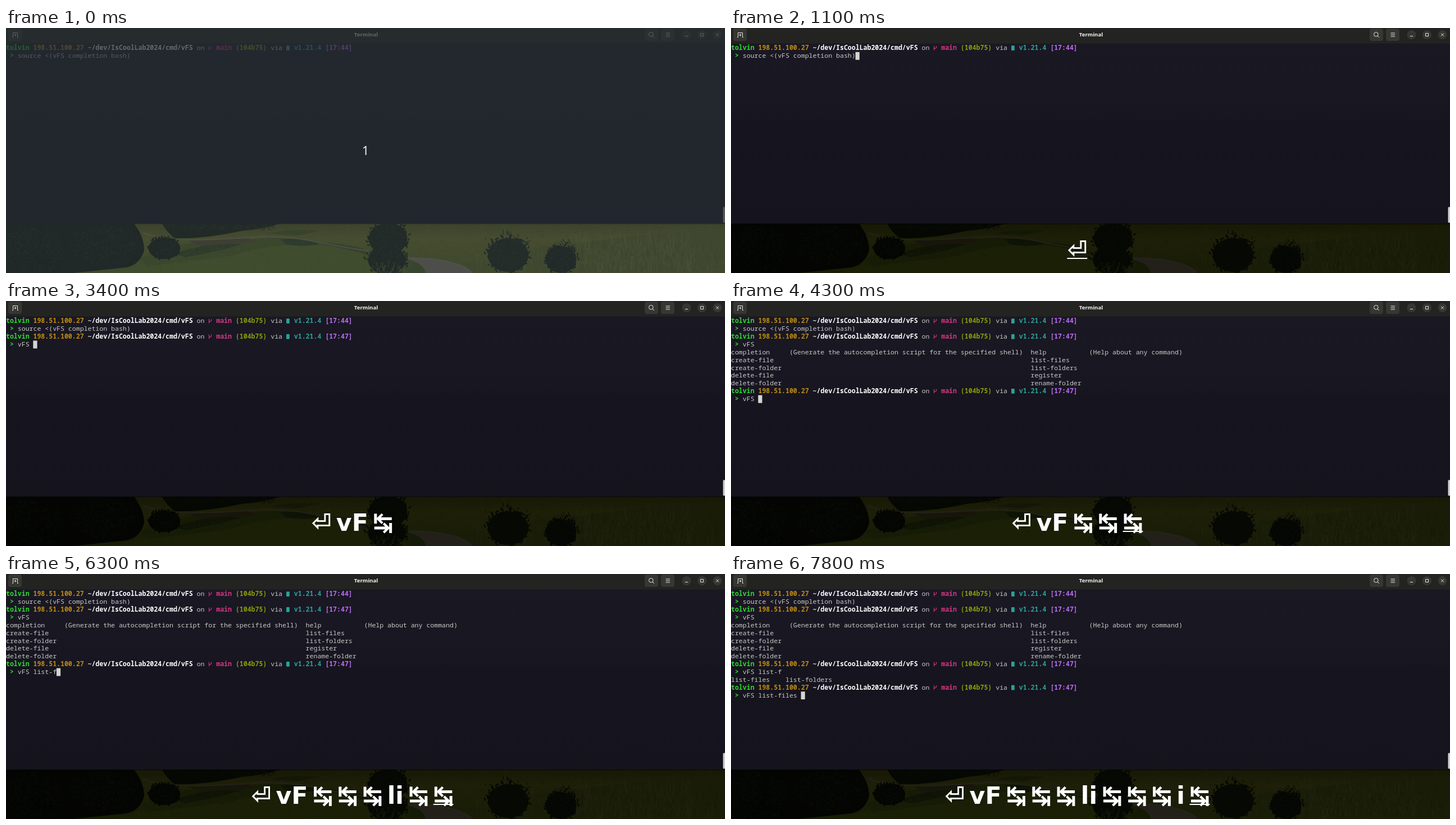
Write an HTML page that moves like this. It is 1280 px wide and 436 px high and loops after 8000 ms.

```html
<!DOCTYPE html>
<html lang="en">
<head>
<meta charset="utf-8">
<title>Terminal</title>
<style>
  html, body { margin: 0; width: 100%; height: 100%; overflow: hidden; background: #17151f; }
  svg { display: block; width: 1280px; height: 436px; }
  text { white-space: pre; }
  #term { font: 11.55px "Noto Sans Mono", "DejaVu Sans Mono", monospace; fill: #c9cac6; font-variant-ligatures: none; }
  #keys { font: bold 42.67px "DejaVu Sans", sans-serif; fill: #fff; }
  .b { font-weight: 700; }
</style>
</head>
<body>
<svg viewBox="0 0 1280 436" xmlns="http://www.w3.org/2000/svg">
  <defs>
    <linearGradient id="meadow" x1="0" y1="0" x2="0" y2="1">
      <stop offset="0" stop-color="#747b1c"/>
      <stop offset=".3" stop-color="#959b28"/>
      <stop offset="1" stop-color="#798f1c"/>
    </linearGradient>
    <linearGradient id="glass" x1="0" y1="0" x2="0" y2="1">
      <stop offset="0" stop-color="#1a1823"/>
      <stop offset=".38" stop-color="#181621"/>
      <stop offset=".46" stop-color="#16141e"/>
      <stop offset="1" stop-color="#15131c"/>
    </linearGradient>
    <clipPath id="below"><rect y="348" width="1280" height="88"/></clipPath>
  </defs>

  <g id="land" clip-path="url(#below)">
    <rect y="348" width="1280" height="88" fill="url(#meadow)"/>
  </g>
  <rect id="shade" y="348" width="1280" height="88" fill="#000" opacity=".8"/>

  <rect y="27" width="1280" height="321" fill="url(#glass)"/>
  <rect width="1280" height="27.5" fill="#232421"/>
  <g fill="#363733">
    <rect x="4" y="1" width="24" height="22" rx="4"/>
    <rect x="1137" y="1" width="24" height="22" rx="4"/>
    <rect x="1166" y="1" width="24" height="22" rx="4"/>
    <circle cx="1211.500" cy="12" r="8"/><circle cx="1239" cy="12" r="8"/><circle cx="1266.500" cy="12" r="8"/>
  </g>
  <g fill="none" stroke="#e6e6e3" stroke-width="1">
    <path d="M11 16.500h1.500v-8h8v8h1.500M16.500 10.500v4M14.500 12.500h4"/>
    <circle cx="1148.300" cy="11.300" r="3.800"/><path d="M1151 14l3 3"/>
    <path d="M1174.500 9h7.500M1174.500 12h7.500M1174.500 15h7.500"/>
    <path d="M1209 14.500h5M1236.500 9.500h5v5h-5zM1264 9.500l5 5m0-5l-5 5"/>
  </g>
  <text x="641" y="15.300" text-anchor="middle" font-family="Noto Sans, Open Sans, sans-serif" font-size="9.600" font-weight="700" fill="#f4f4f2">Terminal</text>
  <rect x="1276.500" y="318.500" width="5" height="28" rx="1.500" fill="#cfcfcb"/>

  <g id="term"></g>
  <rect id="cursor" width="7.200" height="13.900" fill="#d3d7cf"/>
  <g id="keys">
    <text id="keyText" x="616.300" y="409" text-anchor="middle"></text>
    <rect id="line" y="409" height="2"/>
  </g>
  <g id="count">
    <rect width="1280" height="436" fill="rgb(40,46,52)" opacity=".72"/>
    <text x="640" y="226" text-anchor="middle" font-family="Noto Sans, Open Sans, sans-serif" font-size="22" fill="#eceff0">1</text>
  </g>
</svg>
<script>
const LOOP = 8000, CW = 6.93, RH = 13.87, TOP = 28.9;
const $ = id => document.getElementById(id);

function add(parent, tag, attrs, text) {
  const el = document.createElementNS("http://www.w3.org/2000/svg", tag);
  for (const k in attrs) el.setAttribute(k, attrs[k]);
  if (text !== undefined) el.textContent = text;
  parent.append(el);
  return el;
}

// ---- landscape ----
let seed = 11;
const rnd = () => (seed = (seed * 16807) % 2147483647) / 2147483647;
const span = (a, b) => a + (b - a) * rnd();
const land = $("land");
const fill = (d, colour) => add(land, "path", { d, fill: colour });

function strokes(n, place, dx, dy, colour, width, opacity = 1) {
  let d = "";
  for (let i = 0; i < n; i++) {
    const [x, y] = place();
    d += `M${x.toFixed(1)} ${y.toFixed(1)}l${span(-dx, dx).toFixed(1)} ${span(-dy, dy / 4).toFixed(1)}`;
  }
  add(land, "path", { d, fill: "none", stroke: colour, "stroke-width": width, "stroke-linecap": "round", opacity });
}
const box = (x0, x1, y0, y1) => () => [span(x0, x1), span(y0, y1)];
const disc = (cx, cy, rx, ry) => () => {
  const a = rnd() * 6.283, r = Math.sqrt(rnd());
  return [cx + Math.cos(a) * r * rx, cy + Math.sin(a) * r * ry];
};
function bush(cx, cy, rx, ry, dark = "#121b0b") {
  const n = Math.round(rx * ry / 7);
  add(land, "ellipse", { cx, cy, rx: rx * .88, ry: ry * .88, fill: dark });
  strokes(n, disc(cx, cy, rx, ry), 3, 4, dark, 2.4);
  strokes(n, disc(cx, cy - 2, rx * .9, ry * .9), 2, 2, "#2c3d17", 1.2, .7);
  strokes(n / 3, disc(cx, cy - 3, rx * .8, ry * .8), 1.5, 1.5, "#45571f", 1, .55);
}

function paintLand() {
  strokes(750, box(440, 1280, 350, 405), 7, 1, "#b2ac3c", .8, .5);
  strokes(450, box(440, 1280, 350, 400), 8, 1, "#5f711a", .8, .5);
  fill("M190 436Q330 395 480 376Q570 382 640 398L650 436Z", "#829a20");
  fill("M240 410Q300 376 400 382Q470 366 560 381Q450 388 400 406L250 424Z", "#6d8a1d");
  fill("M325 378L430 374L445 380L400 385L345 389Z", "#786b35");
  fill("M300 402Q350 382 420 385L380 396L320 408Z", "#465f17");
  fill("M488 376Q530 372 560 384Q530 391 498 385Z", "#435f18");
  fill("M470 366Q500 356 560 361L520 369Z", "#617a1c");
  fill("M560 382Q620 385 645 397L640 403Q600 391 560 385Z", "#59721c");
  strokes(500, box(200, 650, 388, 436), 2, 4, "#a3b237", .9, .5);
  strokes(250, box(200, 650, 388, 436), 2, 4, "#5d7619", .9, .6);
  add(land, "path", { d: "M244 364Q270 377 340 377Q410 375 455 371Q500 371 535 377Q570 385 645 397",
    fill: "none", stroke: "#b5a875", "stroke-width": 2 });
  fill("M278 348H488Q460 358 420 361Q350 376 300 374Q285 362 278 348Z", "#17210c");
  strokes(170, box(285, 480, 348, 360), 3, 4, "#2b3b16", 1.2, .8);
  fill("M0 348H228Q246 372 246 395Q240 420 215 426L120 436H0Z", "#121b0b");
  bush(45, 395, 66, 44);
  bush(175, 388, 72, 40);
  bush(55, 420, 48, 24, "#0d1409");
  bush(282, 392, 32, 22);

  // near path and the plants around it
  fill("M714 408Q770 408 806 420Q825 427 831 436H747Q746 421 714 411Z", "#b1a183");
  fill("M716 413Q743 417 747 436H700Z", "#66821f");
  add(land, "path", { d: "M720 410Q790 409 828 433", fill: "none", stroke: "#c4b698", "stroke-width": 1 });
  fill("M815 420Q930 388 1040 380Q1170 362 1280 358V436H832Z", "#7d8d25");
  strokes(420, box(830, 1280, 395, 440), 4, 14, "#a9b245", 1, .55);
  strokes(300, box(1010, 1220, 380, 440), 7, 26, "#b3bd59", .8, .6);
  strokes(200, box(1020, 1280, 390, 440), 5, 18, "#586f1b", .9, .6);
  bush(680, 375, 39, 32, "#17220d");
  bush(678, 413, 38, 29, "#17220d");
  bush(894, 404, 41, 34, "#1a2610");
  bush(988, 412, 31, 27, "#151f0d");
  strokes(45, disc(893, 382, 42, 16), 5, 9, "#1d2a11", 1.1);
  strokes(35, disc(988, 394, 31, 12), 5, 8, "#1d2a11", 1.1);
  strokes(60, box(645, 720, 424, 440), 4, 12, "#8ea032", .9, .8);
  add(land, "rect", { y: 348, width: 1280, height: 1.2, fill: "#0d0f09", opacity: .6 });
}

// ---- terminal ----
const term = $("term");
const timed = []; // [element, first visible time]
const rowTop = r => TOP + r * RH;
const put = (parent, row, col, text, attrs = {}) =>
  add(parent, "text", { x: (col * CW).toFixed(2), y: (rowTop(row) + 10.5).toFixed(2), ...attrs }, text);

function group(from) {
  const g = add(term, "g", {});
  timed.push([g, from]);
  return g;
}
function prompt(row, clock, from) {
  const g = group(from), y = rowTop(row);
  const bold = (col, text, colour) => put(g, row, col, text, { class: "b", fill: colour });
  bold(0, "tolvin", "#2fd832");
  bold(7, "198.51.100.27", "#bd8b10");
  bold(21, "~/dev/IsCoolLab2024/cmd/vFS", "#ffffff");
  put(g, row, 49, "on");
  add(g, "path", { d: `M361.500 ${y + 3}v7.500M365.500 ${y + 3}v2.500q0 1.500-4 2.500`, fill: "none", stroke: "#d33682", "stroke-width": 1.2 });
  bold(54, "main", "#d33682");
  bold(59, "(104b75)", "#8a9c0c");
  put(g, row, 68, "via");
  add(g, "rect", { x: 499, y: y + 2.3, width: 5.8, height: 8.8, rx: 1, fill: "#2aa198" });
  bold(74, "v1.21.4", "#2aa198");
  bold(82, `[${clock}]`, "#bb6cf5");
  if (row < 13 || from) bold.call(null, 0, "", "#fff");
  put(g, row + 1, 1, ">", { class: "b", fill: "#2fd832" });
}
function listing(from, row, cells) {
  const g = group(from);
  for (const [r, col, text] of cells) put(g, row + r, col, text);
}

// [time, row, text, start column]
const input = [
  [0, 1, "source <(vFS completion bash)", 3],
  [1200, 2, "", 0],
  [1400, 3, "", 3], [2500, 3, "v", 3], [2900, 3, "vF", 3], [3200, 3, "vFS ", 3],
  [4300, 10, "vFS ", 3], [5100, 10, "vFS l", 3], [5200, 10, "vFS li", 3], [5500, 10, "vFS list-f", 3],
  [6800, 13, "vFS list-f", 3], [7600, 13, "vFS list-fi", 3], [7800, 13, "vFS list-files ", 3]
];
const cursorOff = [[0, 100], [600, 1100], [1800, 2300], [4800, 5100], [6000, 6300], [7300, 7600]];
const typed = {};

function buildTerm() {
  prompt(0, "17:44", 0);
  prompt(2, "17:47", 1400);
  listing(4300, 4, [
    [0, 0, "completion"], [0, 15, "(Generate the autocompletion script for the specified shell)"],
    [0, 77, "help"], [0, 92, "(Help about any command)"],
    [1, 0, "create-file"], [1, 77, "list-files"],
    [2, 0, "create-folder"], [2, 77, "list-folders"],
    [3, 0, "delete-file"], [3, 77, "register"],
    [4, 0, "delete-folder"], [4, 77, "rename-folder"]
  ]);
  prompt(9, "17:47", 4300);
  listing(6800, 11, [[0, 0, "list-files"], [0, 14, "list-folders"]]);
  prompt(12, "17:47", 6800);
  for (const [, row, , col] of input) typed[row] = typed[row] || put(term, row, col, "");
}

// ---- pressed keys: [time, key, underline duration] ----
const TAB = "\u21b9", THIN = "\u2009";
const presses = [
  [1100, "\u23ce", 300], [2500, "v"], [2900, "F"], [3200, TAB], [3800, TAB], [4300, TAB],
  [5100, "l"], [5200, "i"], [5400, TAB], [6300, TAB], [6700, TAB], [7500, "i"], [7800, TAB]
];
const letter = k => /[a-z]/i.test(k);
let shown = -1;

function drawKeys(t) {
  const past = presses.filter(p => p[0] <= t), n = past.length;
  const label = $("keyText"), line = $("line");
  if (n !== shown) {
    shown = n;
    let s = "";
    past.forEach(([, k], i) => {
      if (i && !(letter(k) && letter(past[i - 1][1]))) s += THIN;
      s += k;
    });
    label.textContent = s;
    if (n) {
      const w = label.getSubStringLength(s.length - 1, 1);
      line.setAttribute("x", 616.3 + label.getComputedTextLength() / 2 - w);
      line.setAttribute("width", w);
    }
  }
  const last = past[n - 1];
  show(line, last && t < last[0] + (last[2] || 200));
  show($("shade"), n);
}

function show(el, on) { el.setAttribute("visibility", on ? "visible" : "hidden"); }

function draw(t) {
  for (const [el, from] of timed) show(el, t >= from);
  const text = {};
  let now;
  for (const step of input) if (step[0] <= t) { now = step; text[step[1]] = step[2]; }
  for (const row in typed) {
    const s = text[row] || "";
    if (typed[row].textContent !== s) typed[row].textContent = s;
  }
  const cursor = $("cursor");
  cursor.setAttribute("x", (now[3] + now[2].length) * CW - .2);
  cursor.setAttribute("y", rowTop(now[1]));
  show(cursor, !cursorOff.some(([a, b]) => t >= a && t < b));
  drawKeys(t);
  show($("count"), t < 100);
}

paintLand();
buildTerm();
const start = performance.now();
function tick() {
  draw((performance.now() - start) % LOOP);
  requestAnimationFrame(tick);
}
tick();
</script>
</body>
</html>
```
